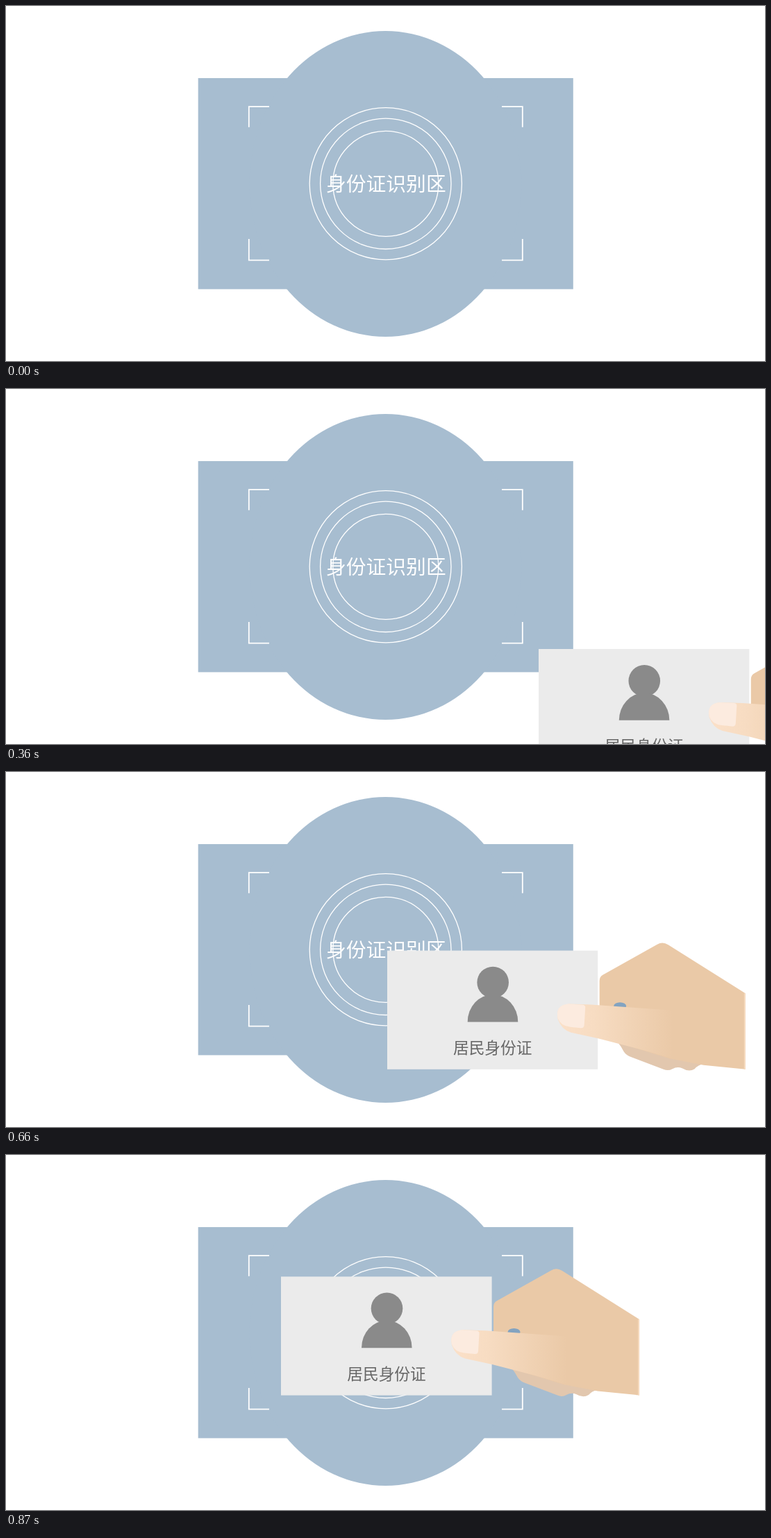
Write an HTML page that moves like this. It is 1093 px wide and 512 px high and loops after 1.87 s.

```html
<!DOCTYPE html>
<html lang="zh-CN">
<head>
<meta charset="utf-8">
<title>身份证识别区</title>
<style>
  html, body { margin: 0; width: 100%; height: 100%; overflow: hidden; background: #fff; }
  svg { display: block; width: 100vw; height: 100vh; }
  text {
    font-family: "Noto Sans CJK SC", "Noto Sans CJK", sans-serif;
    font-weight: 500;
    text-anchor: middle;
  }
  .lines { fill: none; stroke: #fff; }
  .slide { animation: slide 1870ms infinite; }
  /* 29 moves of 30 ms, then a one second rest */
  @keyframes slide {
    0% { transform: translate(632.5px, 340.5px); animation-timing-function: steps(29, end); }
    46.524%, 100% { transform: translate(0, 0); }
  }
</style>
</head>
<body>
<svg viewBox="0 0 1093 512" lang="zh-CN">
  <defs>
    <linearGradient id="skin" gradientUnits="userSpaceOnUse" x1="645" y1="0" x2="808" y2="0">
      <stop offset="0" stop-color="#fbe0c8"/>
      <stop offset=".3" stop-color="#f7dcc2"/>
      <stop offset="1" stop-color="#eac9a7"/>
    </linearGradient>
  </defs>

  <g fill="#a7bdd0">
    <rect x="276.7" y="104" width="540.1" height="304.4"/>
    <ellipse cx="546.5" cy="256.5" rx="196" ry="220.6"/>
  </g>
  <g class="lines" stroke-width="1.3">
    <circle cx="546.8" cy="256.3" r="109.6"/>
    <circle cx="546.8" cy="256.3" r="94.2"/>
    <circle cx="546.8" cy="256.3" r="76"/>
  </g>
  <path class="lines" stroke-width="1.8" d="M349.8 174.8V145.2H379M714 145.2H743.8V174.8M349.8 336V366.7H379M714 366.7H743.8V336"/>
  <text x="547.3" y="267" font-size="28.8" fill="#fff">身份证识别区</text>

  <g class="slide">
    <rect x="396" y="175.4" width="303.6" height="171.2" fill="#ebebeb"/>
    <g fill="#8a8a8a">
      <circle cx="548.5" cy="221.3" r="22.8"/>
      <path d="M512 278.2A36.3 39.5 0 0 1 584.6 278.2Z"/>
    </g>
    <text x="548" y="323.8" font-size="22.7" fill="#666">居民身份证</text>

    <path fill="#e2c7ae" d="M727 306Q733 313 737 321Q740 326 748 329L794 346.5Q801 349.5 807 346Q814 342 821 345Q831 351 839 346Q844 340 852 339L806 312Z"/>
    <path fill="#eac9a7" d="M702 219Q702 213 707 210.3L785 166.5Q793 162 801 167L912 237V346.5L852 340.5L803 331L702 300Z"/>
    <path fill="none" stroke="#f7dcc0" stroke-width="2" d="M911.2 237V346.5"/>
    <ellipse cx="731.5" cy="255.5" rx="9" ry="5.5" fill="#83a3c0"/>
    <path fill="url(#skin)" d="M658 252.3L690 253.3L807 261.5V331L758 317L700 302L661 293.5Q647 289 642 274Q638 254 658 252.3Z"/>
    <path fill="#fcebdf" d="M657 252.3L678 253.5Q682 254 681.5 258L680 283Q679.500 287.500 675 287L660 285.500Q646 284 642 273Q638 254 657 252.3Z"/>
  </g>
</svg>
</body>
</html>
```
